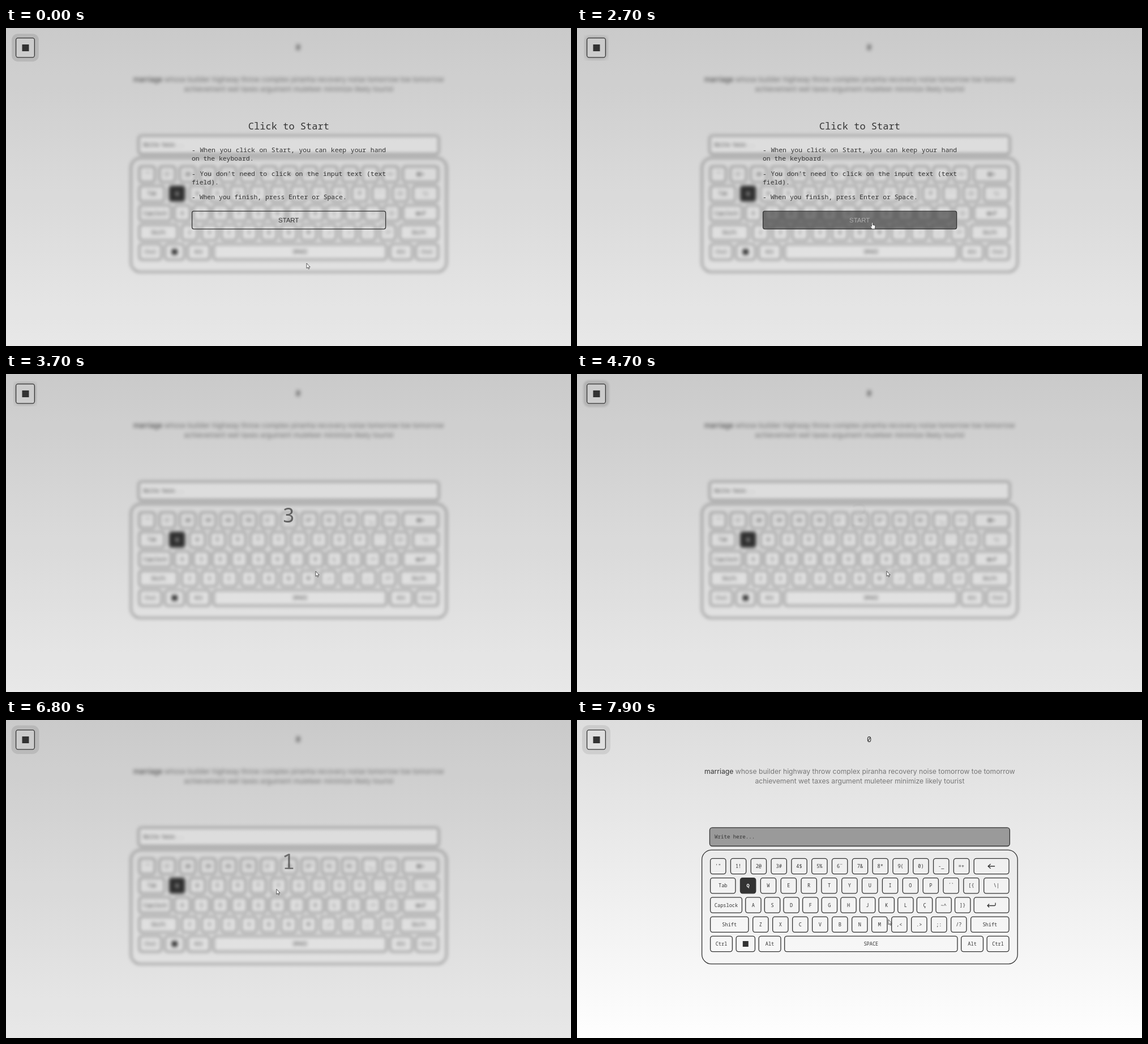
Recreate the animation shown at these times as an HTML page. Size 998 px wide and 561 px high, loop 8 s.

```html
<!DOCTYPE html>
<html lang="en">
<head>
<meta charset="utf-8">
<title>Typing practice</title>
<style>
html, body { margin: 0; width: 100%; height: 100%; overflow: hidden; background: #ddd; }
svg { display: block; width: 100vw; height: 100vh; }
text, .rules { font-family: 'Noto Sans Mono', monospace; fill: #333; color: #333; font-variant-ligatures: none; }
.line { fill: none; stroke: #333; stroke-width: 1.3; }
.mid { text-anchor: middle; }
.words { font: 12.15px Inter, sans-serif; fill: #777; }
.words .now { fill: #333; }
.keys text { font-size: 8.6px; font-weight: 500; }
.rules { font-size: 11.42px; line-height: 15.1px; text-align: justify; }
.rules p { margin: 0 0 11.3px; }
#label { font: 11.4px 'Liberation Sans', Arial, sans-serif; }
</style>
</head>
<body>
<svg viewBox="0 0 998 561" preserveAspectRatio="none">
  <defs>
    <linearGradient id="sky" x2="0" y2="1">
      <stop offset="0" stop-color="#ddd"/>
      <stop offset="1" stop-color="#fefefe"/>
    </linearGradient>
    <filter id="soft" filterUnits="userSpaceOnUse" x="150" y="0" width="700" height="500" color-interpolation-filters="sRGB">
      <feGaussianBlur stdDeviation="3.2"/>
    </filter>
    <mask id="outside">
      <rect width="100" height="100" fill="#fff"/>
      <rect x="17" y="17" width="34" height="35.4" rx="4" fill="#000"/>
    </mask>
  </defs>
  <rect width="998" height="561" fill="url(#sky)"/>

  <g id="page">
    <text class="mid" x="516" y="39" font-size="13.7">0</text>
    <text class="words mid" x="499.4" y="94.7"><tspan class="now">marriage</tspan> whose builder highway throw complex piranha recovery noise tomorrow toe tomorrow</text>
    <text class="words mid" x="499.4" y="111.8">achievement wet taxes argument muleteer minimize likely tourist</text>
    <rect id="field" class="line" x="234.4" y="189.9" width="530" height="32.6" rx="4.5"/>
    <text x="243" y="209" font-size="9.14">Write here...</text>
    <rect class="line" x="220.6" y="229.4" width="557.6" height="201" rx="17"/>
    <g id="keys" class="keys"></g>
  </g>
  <rect id="shade" width="998" height="561" fill="#000" opacity=".085"/>

  <g mask="url(#outside)"><rect id="glow"/></g>
  <rect class="line" x="17.6" y="17.6" width="32.8" height="34.2" rx="3.5"/>
  <rect x="28.5" y="29" width="12" height="12" fill="#333"/>

  <g id="panel">
    <text class="mid" x="499.4" y="179" font-size="17.05">Click to Start</text>
    <foreignObject x="328" y="207.3" width="343.2" height="110">
      <div class="rules">
        <p>- When you click on Start, you can keep your hand on the keyboard.</p>
        <p>- You don't need to click on the input text (text field).</p>
        <p>- When you finish, press Enter or Space.</p>
      </div>
    </foreignObject>
    <rect id="button" class="line" x="328.6" y="323.2" width="342" height="31.4" rx="3"/>
    <text id="label" class="mid" x="499.2" y="342.6">START</text>
  </g>
  <text id="count" class="mid" x="499"></text>

  <g id="arrow">
    <path d="M0 0V9L2 7.2L3.4 10.2L4.8 9.6L3.5 6.7H6.2Z" fill="#fff" stroke="#333" stroke-width=".8"/>
  </g>
  <g id="hand">
    <path d="M-1 1Q-1 0 0 0T1 1V4.4L4.4 5.2Q5.6 5.6 5.4 7L4.6 11.5H-.6L-3 7.4Q-3 6 -1.8 6.6L-1 7.2Z" fill="#fff" stroke="#444" stroke-width=".8"/>
  </g>
</svg>
<script>
const LOOP = 8000, STEP = 100, CLICK = 3100, REVEAL = 7900;
const COUNT_FROM = 3230, BEAT = 1500;
const $ = id => document.getElementById(id);
const set = (el, attrs) => { for (const k in attrs) el.setAttribute(k, attrs[k]); };
const show = (el, on) => el.setAttribute('visibility', on ? 'visible' : 'hidden');
const clamp = v => Math.max(0, Math.min(1, v));

function add(tag, attrs, text = '') {
  const el = document.createElementNS('http://www.w3.org/2000/svg', tag);
  set(el, attrs);
  el.textContent = text;
  $('keys').appendChild(el);
}

// Each row is spread over the full keyboard width.
const rows = [
  `'" 1! 2@ 3# 4$ 5% 6¨ 7& 8* 9( 0) -_ =+ Back:63`,
  'Tab:45.5 Q W E R T Y U I O P ´` [{ \\|:45.5',
  'Capslock:57 A S D F G H J K L Ç ~^ ]} Enter:63',
  'Shift:68.5 Z X C V B N M ,< .> ;: /? Shift:68.5',
  'Ctrl:40 Menu:34.5 Alt:40 SPACE:306.5 Alt:40 Ctrl:40'
];
const icons = {
  Back: 'M6 0H-6M-1.5 -4L-6 0L-1.5 4',
  Enter: 'M7 -4V-1Q7 1 5 1H-7M-4 -2L-7 1L-4 4'
};

function drawKey(name, x, y, w) {
  const dark = name === 'Q', cx = x + w / 2, cy = y + 14.2;
  add('rect', {
    x: x + .6, y: y + .6, width: w - 1.2, height: 27.2, rx: 4,
    fill: dark ? '#333' : 'rgba(255,255,255,.2)', stroke: '#333', 'stroke-width': 1.3
  });
  if (icons[name]) add('path', { class: 'line', d: icons[name], transform: `translate(${cx} ${cy})` });
  else if (name === 'Menu') add('rect', { x: cx - 5, y: cy - 5, width: 10, height: 10, fill: '#333' });
  else add('text', { class: 'mid', x: cx, y: cy + 3, style: dark ? 'fill:#fff;font-weight:700' : '' }, name);
}

rows.forEach((row, r) => {
  const keys = row.split(' ').map(k => {
    const m = k.match(/^(.+):([\d.]+)$/);
    return m ? [m[1], +m[2]] : [k, 28.5];
  });
  const used = keys.reduce((sum, k) => sum + k[1], 0);
  const gap = (528.6 - used) / (keys.length - 1);
  let x = 235;
  for (const [name, w] of keys) {
    drawKey(name, x, 243.8 + r * 34.25, w);
    x += w + gap;
  }
});

// Points are [time, ...values], joined with a soft ease.
function along(points, t) {
  let i = 0;
  while (i < points.length - 2 && t >= points[i + 1][0]) i++;
  const a = points[i], b = points[i + 1];
  const u = clamp((t - a[0]) / (b[0] - a[0])), e = u * u * (3 - 2 * u);
  return a.slice(1).map((v, k) => v + (b[k + 1] - v) * e);
}

const pulse = [[1200, .85], [1900, 1], [2000, 1], [2700, .2], [3700, .06], [4000, .08],
  [4800, .75], [5800, .6], [6600, .95], [7500, .85], [7800, .5], [7900, 1]];
const pointer = [[2000, 531, 415], [2700, 521.5, 343], [3100, 522, 343], [3700, 547, 348],
  [5800, 547, 347.5], [6600, 500, 303], [7100, 437, 290], [7500, 500, 311],
  [7800, 544.5, 349], [7900, 550, 352]];

function drawGlow(t) {
  const [p] = along(pulse, t), s = 8 * p;
  set($('glow'), {
    x: 17 - s, y: 17 - s, width: 34 + 2 * s, height: 35.4 + 2 * s, rx: 4 + s,
    fill: `rgba(0,0,0,${.22 - .14 * p})`,
    style: p < 1 ? `filter:blur(${5 * (1 - p)}px)` : ''
  });
}

function drawCount(t) {
  const on = t >= CLICK && t < REVEAL, since = Math.max(0, t - COUNT_FROM);
  const beat = Math.floor(since / BEAT), p = since / BEAT - beat, size = 26 + 32 * p;
  $('count').textContent = Math.max(1, 3 - beat);
  set($('count'), { 'font-size': size, y: 249.3 + .357 * size, opacity: 1 - p });
  show($('count'), on);
}

function drawPointer(t) {
  const [x, y] = along(pointer, t), over = t < CLICK && y < 355;
  for (const id of ['arrow', 'hand']) {
    set($(id), { transform: `translate(${x} ${y})` });
    show($(id), (id === 'hand') === over);
  }
}

function draw(t) {
  const open = t >= REVEAL, hover = clamp((t - 2460) / 400);
  set($('page'), { filter: open ? 'none' : 'url(#soft)' });
  show($('shade'), !open);
  $('field').style.fill = open ? '#9a9a9a' : 'rgba(255,255,255,.4)';

  show($('panel'), t < CLICK);
  $('button').style.fill = `rgba(51,51,51,${hover})`;
  const ink = 51 + 204 * hover;
  $('label').style.fill = `rgb(${ink},${ink},${ink})`;

  drawGlow(t);
  drawCount(t);
  drawPointer(t);
}

const start = performance.now();
function tick() {
  const t = (performance.now() - start) % LOOP;
  draw(Math.floor(t / STEP) * STEP);
  requestAnimationFrame(tick);
}
tick();
</script>
</body>
</html>
```
